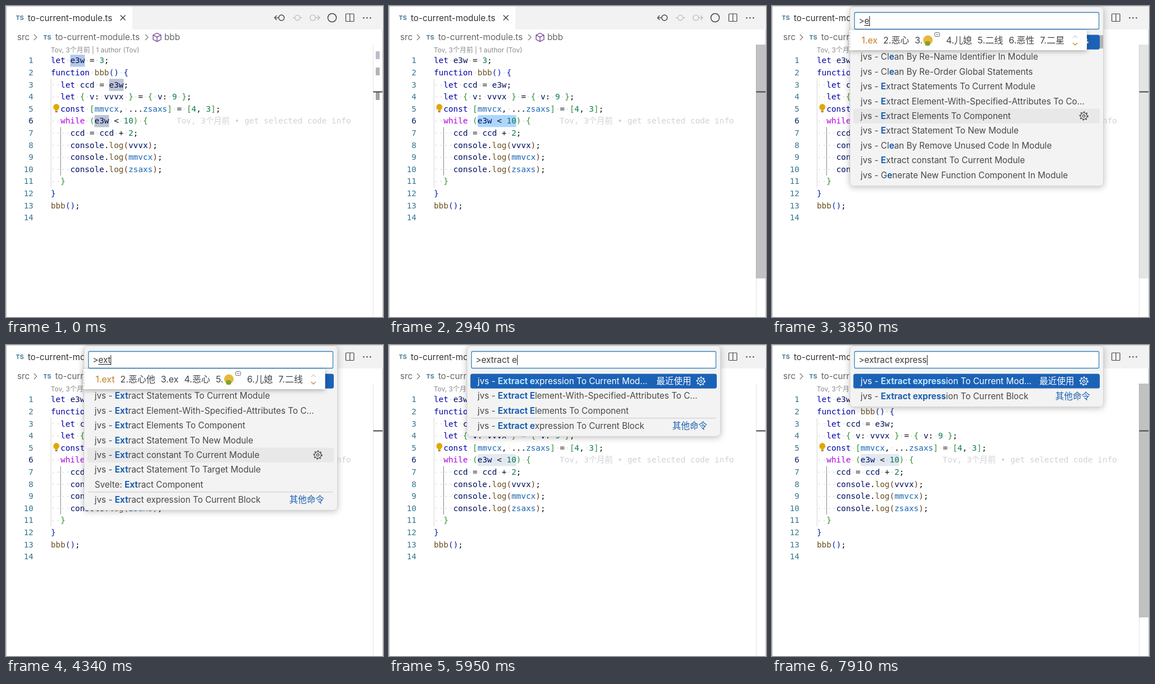
An HTML page with a canvas for the animation above (8000 ms loop, 674 by 556 pixels).

```html
<!DOCTYPE html>
<html lang="zh">
<head>
<meta charset="utf-8">
<style>
html, body { margin: 0; width: 100%; height: 100%; overflow: hidden; background: #fff; }
canvas { display: block; }
</style>
</head>
<body>
<canvas width="674" height="556"></canvas>
<script>
const g = document.querySelector('canvas').getContext('2d');
const SANS = 'Inter, "Noto Sans CJK SC", "Noto Sans CJK", sans-serif';
const MONO = '"DejaVu Sans Mono", "Noto Sans CJK SC", "Noto Sans CJK", monospace';
const UI = '15.3px ' + SANS, CJK = '15.6px "Noto Sans CJK SC", "Noto Sans CJK", sans-serif';
const CODE = '14.4px ' + MONO;
const LEFT = 80.2, CHAR = 8.669, TOP = 87, LINE = 21.6, ROW = 26.4;
const AUTHOR = 'Tov';

const code = `let e3w = 3;
function bbb() {
  let ccd = e3w;
  let { v: vvvx } = { v: 9 };
  const [mmvcx, ...zsaxs] = [4, 3];
  while (e3w < 10) {
    ccd = ccd + 2;
    console.log(vvvx);
    console.log(mmvcx);
    console.log(zsaxs);
  }
}
bbb();
`.split('\n');

const first = 'jvs - Extract expression To Current Mod...';
const block = 'jvs - Extract expression To Current Block';
const elements = 'jvs - Extract Elements To Component';
const attributes = 'jvs - Extract Element-With-Specified-Attributes To C';
const statements = 'jvs - Extract Statements To Current Module';
const toNew = 'jvs - Extract Statement To New Module';
const constant = 'jvs - Extract constant To Current Module';
const broad = [first, 'jvs - Clean By Re-Name Identifier In Module', 'jvs - Clean By Re-Order Global Statements',
  statements, attributes + 'o...', elements, toNew, 'jvs - Clean By Remove Unused Code In Module',
  constant, 'jvs - Generate New Function Component In Module'];
const extracts = [first, statements, attributes + '...', elements, toNew, constant,
  'jvs - Extract Statement To Target Module', 'Svelte: Extract Component', block];

const typing = [[3430, 0], [3850, 1], [4130, 2], [4340, 3], [4480, 4], [4690, 5], [4760, 6], [4970, 7], [5740, 8],
  [5950, 9], [6020, 10], [7210, 11], [7350, 12], [7420, 13], [7630, 14], [7840, 15]];
const drag = [[2100, 15], [2170, 13], [2240, 12], [2310, 11], [2450, 9]];
// '*' stands for the emoji candidate
const candidates = {
  e: 'ex 恶心 * 儿媳 二线 恶性 二星',
  ex: 'ex 恶心 * 儿媳 二线 恶性 二星',
  ext: 'ext 恶心他 ex 恶心 * 儿媳 二线',
  extr: 'extra 恶心他人 ex 恶心 * 儿媳 二线',
  extra: 'extra 问下他人 ex 恶心 * 儿媳 二线',
  extrac: 'extract 问下他绕城 extra ex 恶心 * 儿媳',
  extract: 'extract 问下他绕城 extra ex 恶心 * 儿媳'
};

const clamp = v => Math.max(0, Math.min(1, v));
const within = (t, a, b) => t >= a && t < b;
const step = (steps, t) => steps.reduce((v, [at, next]) => t >= at ? next : v, null);
const colX = c => LEFT + CHAR * c;

function text(s, x, y, color, font = UI) {
  g.font = font;
  g.fillStyle = color;
  g.fillText(s, x, y);
  return x + g.measureText(s).width;
}
function rect(x, y, w, h, color) {
  g.fillStyle = color;
  g.fillRect(x, y, w, h);
}
function round(x, y, w, h, r, fill, stroke) {
  g.beginPath();
  g.roundRect(x, y, w, h, r);
  if (fill) { g.fillStyle = fill; g.fill(); }
  if (stroke) { g.strokeStyle = stroke; g.stroke(); }
}
function line(color, width, ...pts) {
  g.strokeStyle = color;
  g.lineWidth = width;
  g.beginPath();
  for (let i = 0; i < pts.length; i += 2) g.lineTo(pts[i], pts[i + 1]);
  g.stroke();
}
function ring(x, y, r, color, width = 1.2) {
  g.strokeStyle = color;
  g.lineWidth = width;
  g.beginPath();
  g.arc(x, y, r, 0, 7);
  g.stroke();
}
function disc(x, y, r, color) {
  g.fillStyle = color;
  g.beginPath();
  g.arc(x, y, r, 0, 7);
  g.fill();
}
function shadowed(blur, color, draw) {
  g.shadowBlur = blur;
  g.shadowColor = color;
  g.shadowOffsetY = 2;
  draw();
  g.shadowColor = 'transparent';
}

function header() {
  const ink = '#444', pale = '#b8b8b8', small = 'bold 11px ' + SANS;
  rect(226, 0, 448, 42, '#f2f2f2');
  text('TS', 17.5, 25, '#4a7f9d', small);
  text('to-current-module.ts', 39, 27, '#333');
  line('#333', 1.3, 204.5, 16.5, 213.5, 25.5);
  line('#333', 1.3, 213.5, 16.5, 204.5, 25.5);

  ring(492.5, 21, 5, ink, 1.4);
  line(ink, 1.3, 487, 21, 480, 21);
  line(ink, 1.3, 484, 17, 480, 21, 484, 25);
  ring(521, 21, 4.6, pale);
  line(pale, 1.2, 512.5, 21, 516, 21);
  line(pale, 1.2, 526, 21, 529.5, 21);
  ring(548.5, 21, 5, pale);
  line(pale, 1.2, 554, 21, 561, 21);
  line(pale, 1.2, 557, 17, 561, 21, 557, 25);
  ring(583, 21, 7.6, ink, 1.5);
  g.lineWidth = 1.2;
  round(607.5, 14, 14.5, 13.5, 1, null, ink);
  line(ink, 1.2, 614.8, 14, 614.8, 27.5);
  for (const x of [639.5, 645.5, 651.5]) disc(x, 21.3, 1.2, ink);

  text('src', 20, 61, '#666');
  for (const x of [50, 249]) line('#777', 1.2, x, 51, x + 5, 56, x, 61);
  text('TS', 66.5, 59.5, '#4a7f9d', small);
  text('to-current-module.ts', 88, 61, '#666');
  const cube = '#652d90';
  line(cube, 1.2, 270, 48.5, 277, 52, 277, 60, 270, 63.5, 263, 60, 263, 52, 270, 48.5);
  line(cube, 1.2, 263, 52, 270, 55.5, 277, 52);
  line(cube, 1.2, 270, 55.5, 270, 63.5);
  text('bbb', 283, 61, '#666');
}

function tokenColor(w) {
  if (/^(let|const|function)$/.test(w)) return '#0000a8';
  if (w === 'while') return '#af00db';
  if (/^(bbb|log)$/.test(w)) return '#6b5220';
  if (/^(mmvcx|zsaxs)$/.test(w)) return '#1a66b5';
  if (/^\d/.test(w)) return '#0c7a52';
  return /^\w/.test(w) ? '#001060' : '#111';
}

function codeLines() {
  const pairs = ['#0a1fb0', '#319331', '#6f3a18'];
  let depth = 0;
  code.forEach((src, i) => {
    const y = TOP + LINE * i, base = y + 15.4;
    g.textAlign = 'right';
    text(i + 1, 49, base, i === 5 ? '#0b216f' : '#34768f', CODE);
    g.textAlign = 'left';
    for (const m of src.matchAll(/[a-z]\w*|\d+|[^\w]/g)) {
      const w = m[0], x = colX(m.index);
      if (w === ' ') { rect(x + 3.6, y + 10, 1.6, 1.6, '#cdcdcd'); continue; }
      let color = tokenColor(w);
      if ('([{'.includes(w)) color = pairs[depth++];
      else if (')]}'.includes(w)) color = pairs[--depth];
      text(w, x, base, color, CODE);
    }
  });
}

function editor(t) {
  const y6 = TOP + LINE * 5, from = step(drag, t);
  const clicked = within(t, 1400, 2100);
  if (t < 1400) {
    for (const [row, col, color] of [[0, 4, '#b5c8e8'], [2, 12, '#bec4cf'], [5, 9, '#bcc4d2']])
      rect(colX(col), TOP + LINE * row, CHAR * 3, LINE, color);
  }
  if (clicked) {
    rect(LEFT, y6, 576, 1.5, '#eaeaea');
    rect(LEFT, y6 + LINE - 1.5, 576, 1.5, '#eaeaea');
    g.lineWidth = 1;
    for (const c of [8, 17]) {
      rect(colX(c), y6 + 0.5, CHAR, 20.5, '#f1f5f1');
      g.strokeStyle = '#b9b9b9';
      g.strokeRect(Math.round(colX(c)) + 0.5, y6 + 0.5, 8, 20.5);
    }
  }
  if (from) round(colX(from), y6, colX(17) - colX(from), LINE, 3, t < 3430 ? '#add6ff' : '#e3e9f1');

  rect(80, TOP + LINE * 2, 1, LINE * 9, '#d6d6d6');
  rect(97, TOP + LINE * 6, 1.2, LINE * 4, '#979797');
  text(`${AUTHOR}, 3个月前 | 1 author (${AUTHOR})`, 80, 83, '#8c8c8c', '12px ' + SANS);
  codeLines();
  text(`${AUTHOR}, 3个月前 • get selected code info`, 305, y6 + 15.4, '#d2d2d2', CODE);

  const caret = within(t, 1400, 1890) ? 17 : within(t, 2100, 2940) ? from : 0;
  if (caret) rect(colX(caret) - 0.5, y6, 2, LINE, '#000');

  if (!within(t, 1680, 2660)) {
    disc(90, 180.5, 5.4, '#dfa900');
    rect(87.5, 184, 5, 3.5, '#dfa900');
    rect(88, 188, 4, 2, '#8a7a45');
  }
}

function ruler(t) {
  rect(656, 69, 1, 487, '#e4e4e4');
  if (t < 1400) {
    rect(661, 81, 7, 14, '#b9bdcb');
    rect(661, 110, 7, 14, '#b4b4b4');
  }
  if (t < 2100) rect(661, 154, 7, 14, '#a2a2a2');
  const alpha = t < 3400 ? clamp((t - 1330) / 100)
    : t < 5950 ? 1 - clamp((t - 3400) / 800) : clamp((t - 6020) / 100);
  rect(656, 69, 17, 418, `rgba(100,100,100,${0.4 * alpha})`);
  rect(656.5, 152.5, 17, 2, '#444');
}

function gear(x, y, color) {
  ring(x, y, 5.8, color, 1.1);
  g.setLineDash([2.4, 3.1]);
  ring(x, y, 7.2, color, 1.7);
  g.setLineDash([]);
  ring(x, y, 2.2, color, 1.1);
}

function label(s, query, x, y, color, mark) {
  const at = query ? s.toLowerCase().indexOf(query) : -1;
  if (at < 0) return text(s, x, y, color);
  x = text(s.slice(0, at), x, y, color);
  x = text(s.slice(at, at + query.length), x, y, mark, 'bold ' + UI);
  text(s.slice(at + query.length), x, y, color);
}

function palette(t, query) {
  const n = query.length;
  const rows = n < 3 ? broad : n < 9 ? extracts
    : n === 9 ? [first, attributes + '...', elements, block] : [first, block];
  const bottom = 58.2 + ROW * rows.length;
  shadowed(12, 'rgba(0,0,0,.25)', () => round(139, 1, 454, bottom - 1, 7, '#f3f3f3'));
  g.lineWidth = 1;
  round(139.5, 1.5, 453, bottom - 2, 7, null, '#d4d4d4');
  g.lineWidth = 1.3;
  round(147.5, 11.5, 437, 30, 2, '#fff', '#3a84c0');

  const start = text('>', 155, 32, '#3b3b3b');
  const end = text(query, start, 32, '#3b3b3b');
  if (within(t, 3850, 5110)) rect(start, 34, end - start, 1.2, '#333');
  if (!within(t, 5600, 5740) && !within(t, 6510, 7000)) rect(Math.round(end), 18, 1, 18, '#222');

  rows.forEach((s, i) => {
    const y = 51.4 + ROW * i, last = s === block;
    const base = y + 18.6 + (last ? 1 : 0);
    if (i === 0) {
      round(145.5, y, 440.5, ROW, 3.6, '#1b62b7');
      label(s, query.trim(), 158.5, base, '#fff', '#bbe7ff');
      text('最近使用', 478, base, '#fff', CJK);
      gear(557.5, y + 13.2, '#fff');
      return;
    }
    if (i === 5) {
      round(145.5, y, 440.5, ROW, 3.6, '#e8e8e8');
      gear(557.5, y + 13.2, '#444');
    }
    if (last) {
      rect(147, y - 0.4, 437, 1.2, '#cfcfcf');
      text('其他命令', 506.5, base, '#1b5fb0', CJK);
    }
    label(s, query.trim(), 158.5, base, '#484848', '#1b5fb0');
  });
  if (rows === broad) rect(586, 52, 6, 24, '#b4b4b4');
}

function candidateBar(query) {
  const items = candidates[query].split(' ');
  const font = '16px ' + SANS;
  const width = s => {
    g.font = font;
    return s.endsWith('*') ? 46 : g.measureText(s).width;
  };
  const names = items.map((s, i) => `${i + 1}.${s}`);
  const end = names.reduce((x, s) => x + width(s) + 10, 160) + 30;
  shadowed(8, 'rgba(0,0,0,.3)', () => round(138, 43, end - 138, 36, 2, '#fff'));
  for (let y = 48; y < 77; y += 5) disc(139.5, y, 1, '#c4c4c4');
  let x = 160;
  names.forEach((s, i) => {
    text(s.replace('*', ''), x, 67, i ? '#444' : '#bf7f25', font);
    if (s.endsWith('*')) {
      disc(x + 23.5, 61, 8.5, '#e8b83c');
      round(x + 18.5, 63, 9, 8, 3, '#7da52b');
      g.lineWidth = 1;
      round(x + 35.5, 47.5, 9, 7, 2, '#fff', '#666');
      rect(x + 37.5, 50.5, 5, 1, '#777');
    }
    x += width(s) + 10;
  });
  line('#cfcfcf', 1.2, end - 25, 57, end - 21, 53, end - 17, 57);
  line('#bf7f25', 1.2, end - 25, 66, end - 21, 70, end - 17, 66);
}

function frame(now) {
  const t = now % 8000;
  rect(0, 0, 674, 556, '#fff');
  header();
  editor(t);
  ruler(t);
  rect(0, 0, 674, 1, '#cfcfcf');
  rect(0, 0, 1, 556, '#b8b8b8');
  rect(673, 42, 1, 514, '#c4c4c4');
  const typed = step(typing, t);
  if (typed !== null) {
    const query = 'extract express'.slice(0, typed);
    palette(t, query);
    if (within(t, 3850, 5110)) candidateBar(query);
  }
  requestAnimationFrame(frame);
}
requestAnimationFrame(frame);
</script>
</body>
</html>
```
